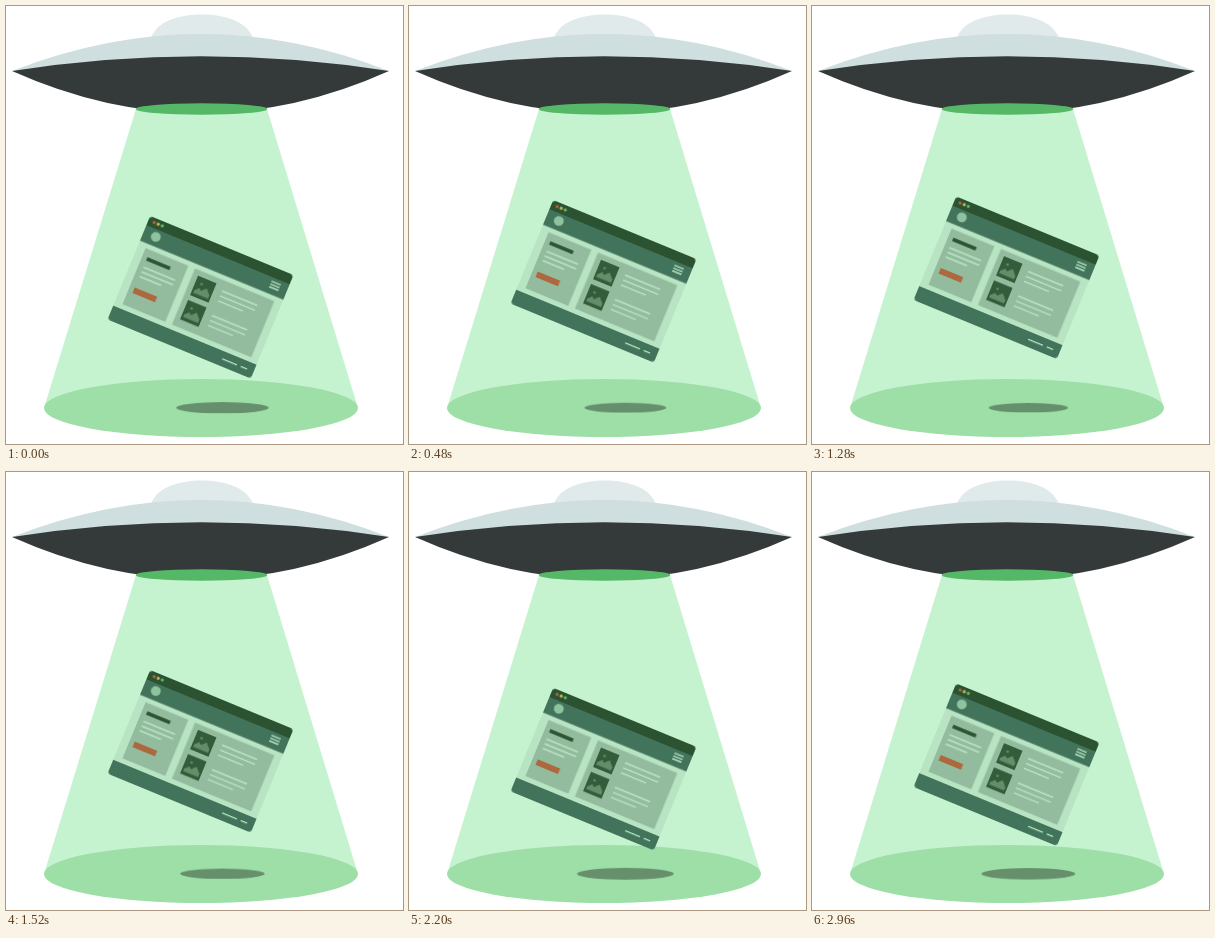
Recreate the animation shown at these times as an HTML page without scripts. Size 397 by 438 pixels, loop 3 s.

```html
<!DOCTYPE html>
<html lang="en">
<head>
<meta charset="utf-8">
<title>Saucer lifting a web page</title>
<style>
  html, body { margin: 0; width: 100%; height: 100%; overflow: hidden; background: #fff; }
  svg { display: block; width: 397px; height: 438px; }

  /* The cycle begins with the page at its highest point. */
  .hover, .shadow { animation: 3s -1.9s infinite; }
  .hover { animation-name: hover; }
  .shadow { animation-name: shadow; fill: #668f6b; }

  @keyframes hover {
    0%, 100% { transform: translate(194.5px, 270.6px); animation-timing-function: cubic-bezier(.4, 0, .2, 1); }
    50% { transform: translate(194.5px, 298.4px); animation-timing-function: cubic-bezier(.37, 0, .3, 1); }
  }
  @keyframes shadow {
    0%, 100% { transform: translate(216.4px, 401.8px) scale(.806); animation-timing-function: cubic-bezier(.4, 0, .2, 1); }
    50% { transform: translate(216.4px, 401.8px) scale(1); animation-timing-function: cubic-bezier(.37, 0, .3, 1); }
  }

  .teal { fill: #42745b; }
  .deep { fill: #2b5231; }
  .panel { fill: #92bc9d; }
  .lines { fill: none; stroke: #b9e6c4; stroke-width: 1.3; }
</style>
</head>
<body>
<svg viewBox="0 0 397 438">
  <defs>
    <clipPath id="frame"><rect width="155" height="112" rx="3.5"/></clipPath>
    <g id="thumb">
      <rect width="20" height="21" fill="#335c3a"/>
      <path d="M2 17.5V15L6 11L8.500 13L13 8.500L18 14V17.500Z" fill="#628f6a"/>
      <circle cx="6.500" cy="6.500" r="1.300" fill="#628f6a"/>
    </g>
    <path id="copy" d="M95 0H133M95 5.300H133M95 10.600H122"/>
  </defs>

  <!-- saucer -->
  <path d="M145 32C150 16 172 8.500 196 8.500S241 16 247 32Z" fill="#e1eaea"/>
  <path d="M6 65Q195 -9 383 65Z" fill="#cfdede"/>
  <path d="M6 65Q195 35.500 383 65Q195 149.500 6 65Z" fill="#343a3a"/>

  <!-- beam -->
  <path d="M130 103H261L352 402H38Z" fill="#c5f2cf"/>
  <ellipse cx="195" cy="402" rx="157" ry="29" fill="#9edfa8"/>
  <ellipse cx="195.500" cy="103" rx="65.800" ry="5.800" fill="#54b867"/>

  <ellipse class="shadow" rx="48.800" ry="5.900"/>

  <g class="hover">
    <g transform="rotate(22.4) translate(-77.5 -56)" clip-path="url(#frame)">
      <rect width="155" height="112" fill="#b9e4c3"/>
      <rect class="teal" width="155" height="26.700"/>
      <rect class="deep" width="155" height="10"/>
      <rect class="teal" y="97" width="155" height="15"/>

      <circle cx="6.200" cy="4.600" r="1.600" fill="#b5653e"/>
      <circle cx="10.600" cy="4.600" r="1.600" fill="#c9b554"/>
      <circle cx="15" cy="4.600" r="1.600" fill="#62b86c"/>
      <circle cx="13.200" cy="17.300" r="4.900" fill="#8fc3a0"/>
      <path class="lines" d="M137 14.200H147M137 17.100H147M137 20H147"/>

      <rect class="panel" x="8" y="31.500" width="46.300" height="60.700"/>
      <rect class="deep" x="13.200" y="39.200" width="25.200" height="3.600"/>
      <path class="lines" d="M13.400 50H47.500M13.400 55H47.500M13.400 60H36.500"/>
      <rect x="13" y="72" width="24.300" height="6" fill="#ad6840"/>

      <rect class="panel" x="61.500" y="31.500" width="85.800" height="60.700"/>
      <use href="#thumb" x="67" y="37"/>
      <use href="#thumb" x="67" y="63.200"/>
      <g class="lines">
        <use href="#copy" y="42"/>
        <use href="#copy" y="68.500"/>
        <path d="M121 104.600H137M141 104.600H148"/>
      </g>
    </g>
  </g>
</svg>
</body>
</html>
```
